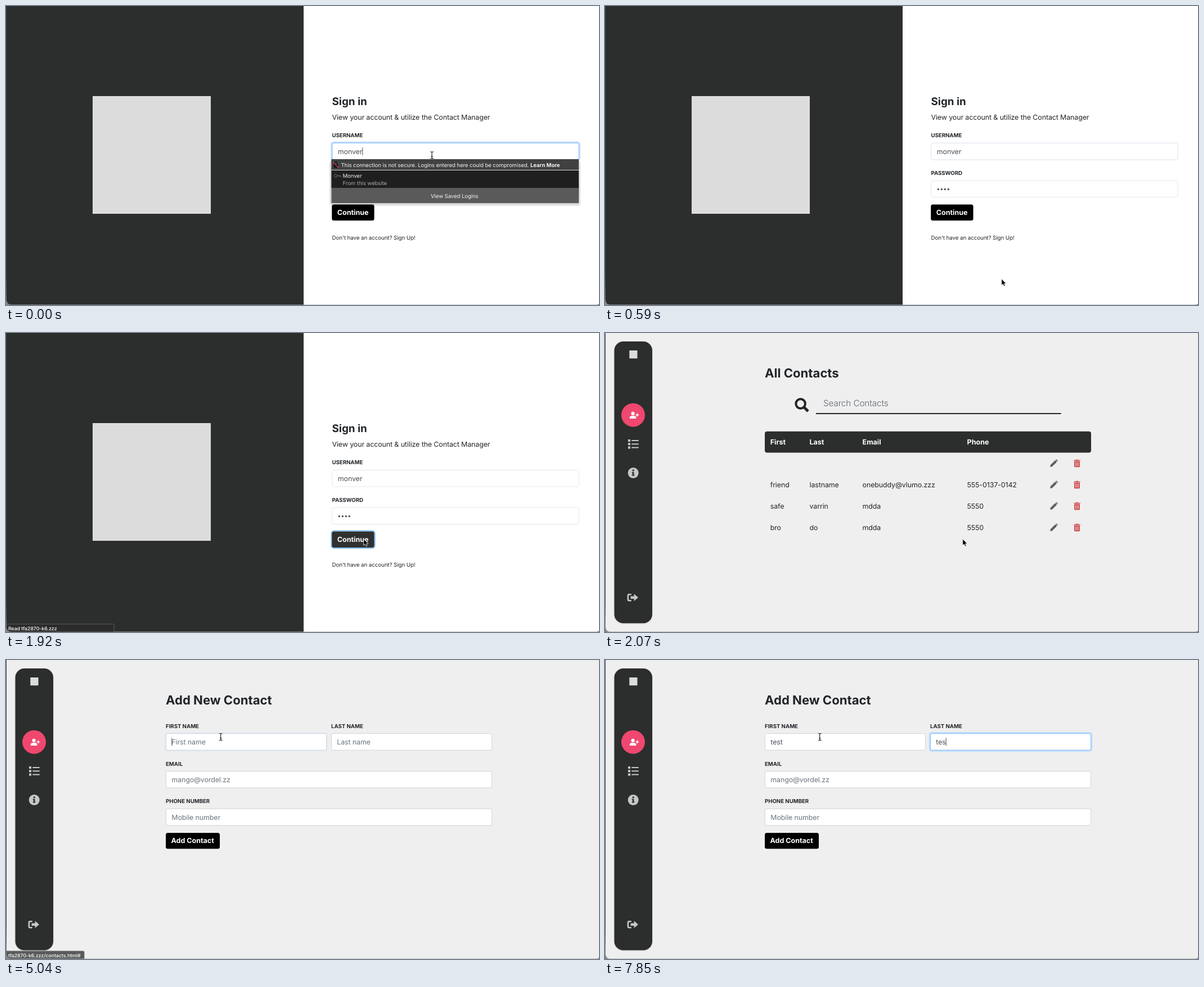
Animation of 1054 by 531 pixels, one loop 7.99 s. Source, as an HTML page:

```html
<!DOCTYPE html>
<html lang="en">
<head>
<meta charset="utf-8">
<title>Contact Manager</title>
<style>
  html, body { margin: 0; width: 100%; height: 100%; overflow: hidden; background: #efefef; }
  svg { display: block; width: 1054px; height: 531px; }
  text { font: 12.4px Inter, sans-serif; letter-spacing: -.0075em; fill: #212529; text-rendering: geometricPrecision; white-space: pre; }
  .bold, .label, .title, .head { font-weight: 700; letter-spacing: 0; }
  .bold { font-size: 12.5px; }
  .label { font-size: 9.65px; }
  .title { font-size: 22.1px; }
  .head { font-size: 18.8px; }
  .small { font-size: 9.75px; }
  .pop { font-size: 9.6px; fill: #f2f2f2; }
  .status { font-size: 8.8px; font-weight: 500; fill: #fff; }
  .white { fill: #fff; }
  .value { fill: #495057; }
  .hint { fill: #6c757d; }
  .search { font-size: 15.3px; font-weight: 300; fill: #5d666e; }
</style>
</head>
<body>
<svg viewBox="0 0 1054 531">
  <defs>
    <linearGradient id="desk" x2="0" y2="1">
      <stop offset="0" stop-color="#343d63"/>
      <stop offset=".9" stop-color="#343d63"/>
      <stop offset="1" stop-color="#8a8a8a"/>
    </linearGradient>
    <clipPath id="frame"><rect x="1" y="-20" width="1056" height="550.6" rx="8"/></clipPath>
    <g id="pencil" fill="#5f6060">
      <path d="M-6.5 6.5l.7-3.7L2.4-5.4l3 3L-2.8 5.8z"/>
      <path d="M3.2-6.1l.7-.7q.7-.6 1.4 0L6.8-5.3q.6.7 0 1.4l-.7.7z"/>
    </g>
    <g id="trash" fill="#d04b4e">
      <path d="M-5.8-5.7H-2.6L-2-6.7H2L2.6-5.7H5.8V-4.2H-5.8z"/>
      <path d="M-5-3.4H5V5.3Q5 6.7 3.6 6.7H-3.6Q-5 6.7-5 5.3z"/>
      <path d="M-2.5-1.8V5M0-1.8V5M2.5-1.8V5" stroke="#efefef" stroke-width=".9"/>
    </g>
  </defs>

  <rect width="1054" height="531" fill="url(#desk)"/>
  <g clip-path="url(#frame)">
    <g id="login">
      <rect width="1060" height="531" fill="#fff"/>
      <rect width="529" height="531" fill="#2c2e2d"/>
      <rect x="154" y="160" width="210" height="209" fill="#dcdcdc"/>
      <text class="head" x="579.5" y="176.3">Sign in</text>
      <text x="579.5" y="201.5">View your account &amp; utilize the Contact Manager</text>
      <text class="label" x="579.5" y="233.3">USERNAME</text>
      <text class="label" x="579.5" y="300">PASSWORD</text>
      <g id="loginFields"></g>
      <g id="dots" fill="#495057">
        <circle cx="592.3" cy="325.5" r="1.7"/><circle cx="598.3" cy="325.5" r="1.7"/>
        <circle cx="604.3" cy="325.5" r="1.7"/><circle cx="610.3" cy="325.5" r="1.7"/>
      </g>
      <g id="popup">
        <rect x="574.5" y="274" width="447" height="81.5" rx="6" opacity=".08"/>
        <rect x="576.5" y="273" width="443" height="80" rx="4" opacity=".1"/>
        <rect x="578.5" y="272" width="439.5" height="78" fill="#5a5a5a"/>
        <rect x="578.5" y="272" width="439.5" height="19" fill="#414142"/>
        <rect x="578.5" y="291" width="439.5" height="32" fill="#1f1f20"/>
        <rect x="578.5" y="291" width="439.5" height="1" fill="#d8d8d8"/>
        <rect x="582.5" y="281" width="7.5" height="6.5" rx="1" fill="#161616"/>
        <path d="M584 281v-2q0-2.3 2.3-2.3t2.3 2.3v2" fill="none" stroke="#161616" stroke-width="1.4"/>
        <path d="M581.5 277l9.5 10.5" stroke="#d5304f" stroke-width="1.4"/>
        <g fill="none" stroke="#707070">
          <circle cx="586" cy="301.5" r="2.6"/>
          <path d="M588.6 301.5h6.4v2.2M592.4 301.5v2"/>
        </g>
        <text class="pop" x="595.5" y="285.5">This connection is not secure. Logins entered here could be compromised.</text>
        <text class="pop" x="932" y="285.5" font-weight="700" style="font-weight:700">Learn More</text>
        <text class="pop" x="598.5" y="305">Monver</text>
        <text class="pop" x="598.5" y="318.3" fill-opacity=".65">From this website</text>
        <text class="pop" x="797.3" y="340.5" text-anchor="middle">View Saved Logins</text>
      </g>
      <rect id="buttonRing" x="578.5" y="351.5" width="77" height="30.5" rx="4.5" fill="none" stroke="#8cc4fb" stroke-width="2.4"/>
      <rect id="button" x="579.2" y="352.5" width="75.3" height="28.5" rx="3.5"/>
      <text class="bold white" x="588.8" y="371.2">Continue</text>
      <text class="small" x="579.5" y="414.5">Don't have an account? Sign Up!</text>
    </g>

    <g id="app">
      <rect width="1060" height="531" fill="#efefef"/>
      <rect x="15" y="14.5" width="70.5" height="503" rx="18" opacity=".05"/>
      <rect x="16.5" y="15" width="67.5" height="500.5" rx="16" fill="#2c2e2d"/>
      <rect x="43.3" y="31" width="14.2" height="14.2" fill="#dcdcdc"/>
      <circle cx="50" cy="145.7" r="21" fill="#ef476f"/>
      <g fill="#fff">
        <circle cx="49.6" cy="142.9" r="3.1"/>
        <path d="M43.8 152v-1.3q0-3.6 3.7-3.6h4.2q3.7 0 3.7 3.6v1.3z"/>
        <path d="M56.6 142.6h1.5v2.2h2.2v1.5h-2.2v2.2h-1.5v-2.2h-2.2v-1.5h2.2z"/>
      </g>
      <g fill="#c6c8c7">
        <path d="M41 189h4v4h-4zM41 195.2h4v4h-4zM41 201.4h4v4h-4zM47.3 190h12.4v2.1H47.3zM47.3 196.2h12.4v2.1H47.3zM47.3 202.4h12.4v2.1H47.3z"/>
        <circle cx="50.2" cy="248.5" r="9.5"/>
        <path d="M46.8 463v2.4h-3.6q-1 0-1 1v6.6q0 1 1 1h3.6v2.4h-4.2q-3 0-3-3v-7.4q0-3 3-3z"/>
        <path d="M45.6 467.5h6v-4.2l7.4 6.4-7.4 6.4v-4.2h-6z"/>
      </g>
      <circle cx="50.2" cy="243.9" r="1.7" fill="#2c2e2d"/>
      <path d="M47.8 246.8h3.6v5h1v1.6h-4.6v-1.6h1v-3.4h-1z" fill="#2c2e2d"/>

      <g id="list">
        <text class="title" x="284" y="78.8">All Contacts</text>
        <g fill="none" stroke="#212529">
          <circle cx="347.6" cy="125.6" r="8.3" stroke-width="4"/>
          <path d="M354 132l7 7" stroke-width="4.8"/>
        </g>
        <text class="search" x="388" y="130.3">Search Contacts</text>
        <rect x="375" y="142.3" width="435.5" height="1.7"/>
        <rect x="284" y="174.7" width="580" height="37.8" rx="4" fill="#2c2e2d"/>
        <g id="rows"></g>
      </g>

      <g id="form">
        <text class="title" x="284" y="78.8">Add New Contact</text>
        <text class="label" x="284" y="120.5">FIRST NAME</text>
        <text class="label" x="578" y="120.5">LAST NAME</text>
        <text class="label" x="284" y="187.5">EMAIL</text>
        <text class="label" x="284" y="254.4">PHONE NUMBER</text>
        <g id="formFields"></g>
        <rect x="284" y="307" width="96" height="28.3" rx="3.5"/>
        <text class="bold white" x="293.5" y="325.4">Add Contact</text>
      </g>
    </g>

    <rect id="caret" width="1" height="14" fill="#495057"/>
    <g id="reading">
      <rect x="-3" y="516.9" width="195" height="20" rx="2" fill="#2b2b2b" stroke="#5c5c5c"/>
      <text class="status" x="4" y="527.6">Read tfa2870-k6.zzz</text>
    </g>
    <g id="link">
      <rect x="-3" y="516.9" width="142" height="20" rx="2" fill="#5a5a5a" stroke="#777"/>
      <text class="status" x="4" y="527.6">tfa2870-k6.zzz/contacts.html#</text>
    </g>
  </g>

  <g id="cursor">
    <path id="arrow" d="M0 0V11.4L2.6 9.1 4.4 13 6.4 12.1 4.7 8.4H8.2z" stroke="#fff" stroke-width=".8"/>
    <g id="beam" fill="none">
      <path d="M-3-6.3Q0-6.3 0-4.6Q0-6.3 3-6.3M0-4.6V4.6M-3 6.3Q0 6.3 0 4.6Q0 6.3 3 6.3M-1.6 2.2H1.6" stroke="#fff" stroke-width="2.2" opacity=".7"/>
      <path d="M-3-6.3Q0-6.3 0-4.6Q0-6.3 3-6.3M0-4.6V4.6M-3 6.3Q0 6.3 0 4.6Q0 6.3 3 6.3M-1.6 2.2H1.6" stroke="#111" stroke-width="1.1"/>
    </g>
    <path id="hand" d="M-1.2.8Q0-.8 1.2.8V5Q2.4 4 3.5 5.2Q4.8 4.4 5.7 5.8Q7.4 5.4 7.4 7.4V9.4L6 13.5H-1.2L-4.6 8.6Q-4.4 6.6-2.6 7.6L-1.2 9z" stroke="#fff" stroke-width=".8"/>
  </g>
</svg>

<script>
const LOOP = 7990;
const $ = id => document.getElementById(id);
const show = (id, on) => { $(id).style.display = on ? '' : 'none'; };

const field = (id, x, y, w, border) => `
  <rect x="${x}" y="${y}" width="${w}" height="29.6" rx="3" fill="#fff" stroke="${border}"/>
  <g id="${id}Ring" fill="none">
    <rect x="${x - 1.4}" y="${y - 1.4}" width="${w + 2.8}" height="32.4" rx="4" stroke="#bfdeff" stroke-width="2.4"/>
    <rect x="${x}" y="${y}" width="${w}" height="29.6" rx="3" stroke="#80bdff"/>
  </g>
  <text id="${id}" x="${x + 10}" y="${y + 19.3}"></text>`;

const pale = '#e4e7eb', grey = '#ced4da';
$('loginFields').innerHTML = field('user', 579.8, 243.3, 438.4, pale) + field('pass', 579.8, 310, 438.4, pale);
$('formFields').innerHTML = field('first', 284.3, 130.6, 285.4, grey) + field('last', 578.3, 130.6, 285.4, grey)
  + field('email', 284.3, 197.5, 579.4, grey) + field('phone', 284.3, 264.2, 579.4, grey);

const columns = [293.7, 363.5, 457.6, 643.6];
const cells = (words, y, cls) => words.map((w, i) => `<text class="${cls}" x="${columns[i]}" y="${y}">${w}</text>`).join('');
const people = [
  [],
  ['friend', 'lastname', 'onebuddy@vlumo.zzz', '555-0137-0142'],
  ['safe', 'varrin', 'mdda', '5550'],
  ['bro', 'do', 'mdda', '5550'],
];
$('rows').innerHTML = cells(['First', 'Last', 'Email', 'Phone'], 198.2, 'bold white') + people.map((p, i) => {
  const y = 231.5 + 38 * i;
  return cells(p, y + 4.4, '') + `<use href="#pencil" x="797.7" y="${y}"/><use href="#trash" x="839" y="${y}"/>`;
}).join('');

const hints = { first: 'First name', last: 'Last name', email: 'mango@vordel.zz', phone: 'Mobile number' };

// Each step changes only what it names; "at" is the pointer: shape, x, y.
const steps = [
  [0, { page: 'login', at: ['beam', 757, 265], popup: 1, user: 'monver', userRing: 1, caret: 'user' }],
  [140, { at: ['arrow', 690, 304] }],
  [290, { popup: 0, filled: 1 }],
  [440, { at: ['arrow', 702, 420] }],
  [590, { at: ['arrow', 704.8, 484.6], userRing: .06, caret: '' }],
  [740, { userRing: 0 }],
  [890, { at: ['arrow', 690, 452] }],
  [1030, { at: ['arrow', 654, 392] }],
  [1180, { at: ['arrow', 635.7, 365.8], hover: 1 }],
  [1470, { press: .5 }],
  [1620, { press: 1 }],
  [1770, { reading: 1 }],
  [2070, { page: 'list', reading: 0 }],
  [2820, { at: ['arrow', 622, 352] }],
  [2970, { at: ['arrow', 560, 296] }],
  [3120, { at: ['arrow', 468, 226] }],
  [3270, { at: ['arrow', 374, 168] }],
  [3410, { at: ['arrow', 306, 138] }],
  [3560, { at: ['arrow', 267, 127] }],
  [3860, { at: ['arrow', 120, 137] }],
  [4010, { at: ['arrow', 74, 142] }],
  [4150, { at: ['hand', 55, 145], link: 1 }],
  [4300, { page: 'form' }],
  [4450, { at: ['hand', 54, 145] }],
  [4750, { at: ['arrow', 130, 143] }],
  [4900, { at: ['beam', 330, 138] }],
  [5040, { at: ['beam', 381.7, 136.5], caret: 'first', firstRing: .12 }],
  [5190, { firstRing: 1, link: 0 }],
  [5640, { caret: '' }],
  [5790, { first: 't', caret: 'first' }],
  [5940, { first: 'te' }],
  [6090, { first: 'tes' }],
  [6230, { first: 'test' }],
  [6680, { caret: 'last', firstRing: .7, lastRing: .3 }],
  [6830, { firstRing: .1, lastRing: .9 }],
  [6970, { firstRing: 0, lastRing: 1 }],
  [7260, { caret: '' }],
  [7410, { last: 't', caret: 'last' }],
  [7700, { last: 'te' }],
  [7850, { last: 'tes' }],
];

function draw(time) {
  const s = {};
  for (const [start, change] of steps) if (start <= time) Object.assign(s, change);

  show('login', s.page === 'login');
  show('app', s.page !== 'login');
  for (const id of ['list', 'form']) show(id, s.page === id);
  for (const id of ['popup', 'reading', 'link']) show(id, s[id]);
  show('dots', s.filled);
  $('button').setAttribute('fill', s.hover ? '#303030' : '#000');
  $('buttonRing').style.opacity = s.press || 0;

  for (const id of ['user', 'pass', 'first', 'last', 'email', 'phone']) {
    $(id).textContent = s[id] || hints[id] || '';
    $(id).setAttribute('class', s[id] ? 'value' : 'hint');
    $(id + 'Ring').style.opacity = s[id + 'Ring'] || 0;
  }

  show('caret', s.caret);
  if (s.caret) {
    const box = $(s.caret);
    const width = s[s.caret] ? box.getComputedTextLength() : 0;
    $('caret').setAttribute('x', +box.getAttribute('x') + width);
    $('caret').setAttribute('y', box.getAttribute('y') - 11.5);
  }

  const [shape, x, y] = s.at;
  for (const id of ['arrow', 'beam', 'hand']) show(id, shape === id);
  $('cursor').setAttribute('transform', `translate(${x} ${y})`);
}

const begin = performance.now();
function tick() {
  draw((performance.now() - begin) % LOOP);
  requestAnimationFrame(tick);
}
tick();
</script>
</body>
</html>
```
